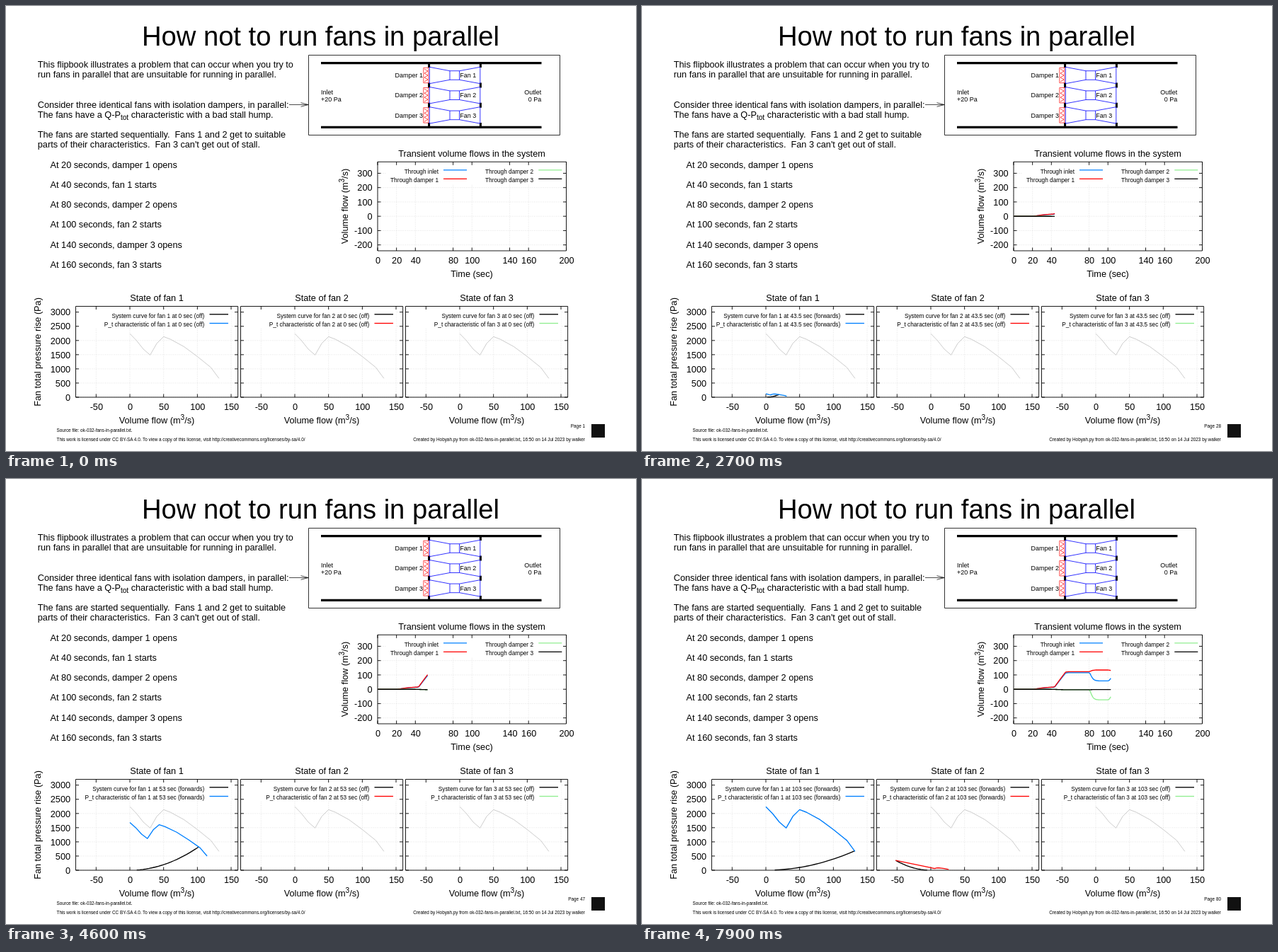
Animation of 890x629 px, one loop 8000 ms. Source, as an HTML page:

```html
<!DOCTYPE html>
<html lang="en">
<head>
<meta charset="utf-8">
<title>How not to run fans in parallel</title>
<style>
html, body { margin: 0; width: 100%; height: 100%; overflow: hidden; background: #fff; }
svg { display: block; width: 890px; height: 629px; }
text { font-family: "Liberation Sans", Arial, sans-serif; font-size: 12.69px; fill: #000; white-space: pre; }
.mid { text-anchor: middle; }
.end { text-anchor: end; }
.label { font-size: 8.98px; }
.key { font-size: 8.28px; }
.foot { font-size: 6.36px; }
.sub { font-size: 10.15px; }
path { fill: none; stroke: #000; stroke-width: .9; }
.grid { stroke: #d4d4d4; stroke-width: .6; stroke-dasharray: 1 1.6; }
.rated { stroke: #c0c0c0; stroke-width: .8; }
.curve { stroke-width: 1.35; stroke-linejoin: round; }
</style>
</head>
<body>
<svg id="stage" viewBox="0 0 890 629"></svg>
<script>
const BLUE = '#0080ff', RED = '#ff0000', GREEN = '#90ee90', BLACK = '#000';
const FAN_COLOURS = [BLUE, RED, GREEN];
const FAN_STARTS = [40, 100, 160];
const RAMP = 15, STEP_MS = 100, STEPS = 80;

// Fan characteristic at full speed: volume flow, total pressure rise
const RATED = [[0, 2240], [10, 1995], [20, 1695], [30, 1488], [40, 1900], [50, 2135],
  [60, 2045], [80, 1785], [100, 1435], [120, 1050], [132, 665]];

// Volume flow through each damper against time
const FLOWS = [
  [[0, 0], [20, 0], [24, 3], [30, 9], [35, 12.5], [40, 14.5], [42, 15], [43, 17], [44, 22],
    [45.5, 35.5], [48, 58], [53, 102], [55, 119], [56, 121.5], [60, 122.5], [80, 122.5],
    [82, 127], [84, 132], [87, 134.3], [100, 134.3], [103, 131.5]],
  [[0, 0], [40, -.4], [55, -3.5], [80, -3.5], [81, -12], [82, -28], [83, -43], [84, -55],
    [85, -63], [87, -71], [90, -73.5], [100, -74], [101, -71], [102, -63], [103, -52]],
  [[0, 0], [40, -.4], [55, -3.5], [80, -3.5], [85, -2], [103, -2]]
];

// Linear interpolation, extended past both ends
function lerp(points, x) {
  let i = 1;
  while (i < points.length - 1 && x > points[i][0]) i++;
  const [x0, y0] = points[i - 1], [x1, y1] = points[i];
  return y0 + (y1 - y0) * (x - x0) / (x1 - x0);
}

const flow = (fan, t) => lerp(FLOWS[fan], t);
const inlet = t => flow(0, t) + flow(1, t) + flow(2, t);

function simTime(step) {
  if (step < 20) return 2 * step;
  if (step < 50) return 40 + (step - 20) / 2;
  if (step < 73) return 55 + 2 * (step - 50);
  return 100 + (step - 73) / 2;
}

const text = (x, y, s, cls = '', extra = '') => `<text x="${x}" y="${y}" class="${cls}" ${extra}>${s}</text>`;
const path = (d, cls = '', extra = '') => `<path d="${d}" class="${cls}" ${extra}/>`;
const line = points => points.length > 1 ? 'M' + points.map(p => p[0].toFixed(2) + ' ' + p[1].toFixed(2)).join('L') : '';
const rect = (x, y, x2, y2) => `M${x} ${y}H${x2}V${y2}H${x}Z`;
const turned = (x, y, s) => text(0, 0, s, 'mid', `transform="translate(${x} ${y}) rotate(-90)"`);
const VOLUME = 'Volume flow (m<tspan class="sub" dy="-5">3</tspan><tspan dy="5">/s)</tspan>';

function makeChart(o) {
  return {
    ...o,
    px: v => o.x0 + v * o.sx,
    py: v => o.y0 - v * o.sy,
    trace(points) { return line(points.map(([x, y]) => [this.px(x), this.py(y)])); }
  };
}

// Grid, a gap for the key, ticks, tick labels and border
function drawChart(c) {
  let grid = '', ticks = '', labels = '';
  for (const v of c.xTicks) {
    const x = c.px(v);
    grid += `M${x} ${c.bottom}V${c.top}`;
    ticks += `M${x} ${c.bottom}v-4.5M${x} ${c.top}v4.5`;
    labels += text(x + .5, c.bottom + 18, v, 'mid');
  }
  for (const v of c.yTicks) {
    const y = c.py(v);
    grid += `M${c.left} ${y}H${c.right}`;
    ticks += `M${c.left} ${y}h4.5M${c.right} ${y}h-4.5`;
    if (c.yLabels) labels += text(c.left - 7.5, y + 4.7, v, 'end');
  }
  const [kx, ky, kx2, ky2] = c.keyBox;
  return path(grid, 'grid') +
    `<rect x="${kx}" y="${ky}" width="${kx2 - kx}" height="${ky2 - ky}" fill="#fff"/>` +
    path(ticks + rect(c.left, c.top, c.right, c.bottom)) + labels +
    `<clipPath id="${c.id}"><path d="${rect(c.left, c.top, c.right, c.bottom + .4)}"/></clipPath>`;
}

const flowChart = makeChart({
  id: 'flows', left: 525, right: 791.5, top: 220.3, bottom: 346, x0: 525, y0: 297.2, sx: 1.3325, sy: .2025,
  xTicks: [0, 20, 40, 80, 100, 140, 160, 200], yTicks: [-200, -100, 0, 100, 200, 300],
  yLabels: true, keyBox: [538, 226, 787, 252]
});

const fanCharts = [0, 1, 2].map(i => {
  const dx = 233 * i;
  return makeChart({
    id: 'fan' + i, left: 98.5 + dx, right: 327.6 + dx, top: 424.5, bottom: 553, x0: 175 + dx, y0: 553, sx: .9535, sy: .0401,
    xTicks: [-50, 0, 50, 100, 150], yTicks: [0, 500, 1000, 1500, 2000, 2500, 3000],
    yLabels: i === 0, keyBox: [104 + dx, 430, 318 + dx, 456]
  });
});

const keyLine = (x, x2, y, colour) => path(`M${x} ${y}H${x2}`, 'curve', `style="stroke:${colour}"`);

function drawNotes() {
  const notes = [
    [0, 'This flipbook illustrates a problem that can occur when you try to'],
    [1, 'run fans in parallel that are unsuitable for running in parallel.'],
    [4, 'Consider three identical fans with isolation dampers, in parallel:'],
    [5, 'The fans have a Q-P<tspan class="sub" dy="3.5">tot</tspan><tspan dy="-3.5"> characteristic with a bad stall hump.</tspan>'],
    [7, 'The fans are started sequentially.  Fans 1 and 2 get to suitable'],
    [8, "parts of their characteristics.  Fan 3 can't get out of stall."]
  ];
  const events = [1, 2, 3].flatMap(n => [
    `At ${60 * n - 40} seconds, damper ${n} opens`, `At ${60 * n - 20} seconds, fan ${n} starts`]);
  const row = k => 87.3 + 14.13 * k;
  return text(444.5, 56.3, 'How not to run fans in parallel', 'mid', 'style="font-size:38.2px"') +
    notes.map(([k, s]) => text(44.8, row(k), s)).join('') +
    events.map((s, i) => text(62.6, row(10 + 2 * i), s)).join('');
}

function drawLayout() {
  let out = path(rect(427.5, 69.5, 782.5, 182.5), '', 'style="stroke-width:.8"') +
    path('M400 139.5H427M416.5 136.7L427 139.5L416.5 142.3', '', 'style="stroke-width:.7"') +
    path('M445 80.6H756.5M445 171.4H756.5', '', 'style="stroke-width:3.4"') +
    text(445, 124.7, 'Inlet', 'label') + text(445, 134.6, '+20 Pa', 'label') +
    text(756.3, 124.7, 'Outlet', 'label end') + text(756.3, 134.6, '0 Pa', 'label end');
  for (const x of [597.6, 670.4])
    out += path(`M${x} 81V87M${x} 108.5V115.5M${x} 136.8V143.8M${x} 165V171`, '', 'style="stroke-width:3"');
  for (let i = 0; i < 3; i++) {
    const y = 98 + 28.2 * i;
    let zigzag = `M591 ${y - 9}`;
    for (let k = 1; k < 7; k++) zigzag += `L${k % 2 ? 596 : 591} ${y - 9 + 3 * k}`;
    out += path(rect(589.8, y - 10.7, 596.8, y + 10.7) + zigzag, '', `style="stroke:${RED};stroke-width:.7"`) +
      path(`M598.3 ${y - 11.7}V${y + 11.7}L627 ${y + 6.3}H640.5L669.8 ${y + 11.7}V${y - 11.7}L640.5 ${y - 6.3}H627Z` +
        `M627 ${y - 6.3}V${y + 6.3}M640.5 ${y - 6.3}V${y + 6.3}`, '', 'style="stroke:#00f;stroke-width:.8"') +
      text(589, y + 3.2, 'Damper ' + (i + 1), 'label end') + text(641.2, y + 3.2, 'Fan ' + (i + 1), 'label');
  }
  return out;
}

function drawFlowChart() {
  const keys = [['Through inlet', BLUE, 0, 0], ['Through damper 1', RED, 0, 1],
    ['Through damper 2', GREEN, 1, 0], ['Through damper 3', BLACK, 1, 1]];
  return drawChart(flowChart) +
    text(658, 212.8, 'Transient volume flows in the system', 'mid') +
    text(658, 383, 'Time (sec)', 'mid') + turned(483, 283, VOLUME) +
    keys.map(([s, colour, col, row]) => text(611 + 134 * col, 236.8 + 12.6 * row, s, 'key end') +
      keyLine(618 + 134.3 * col, 651 + 134.3 * col, 231.8 + 12.5 * row, colour)).join('') +
    `<g clip-path="url(#flows)">` +
    [BLUE, RED, GREEN, BLACK].map((c, i) => path('', 'curve', `id="flow${i}" style="stroke:${c}"`)).join('') + '</g>';
}

function drawFanChart(c, i) {
  const dx = 233 * i;
  return drawChart(c) +
    text(213 + dx, 416.6, 'State of fan ' + (i + 1), 'mid') + text(213 + dx, 590, VOLUME, 'mid') +
    text(280.2 + dx, 440.8, '', 'key end', `id="sysText${i}"`) + keyLine(287.5 + dx, 314 + dx, 435.8, BLACK) +
    text(280.2 + dx, 453.3, '', 'key end', `id="charText${i}"`) + keyLine(287.5 + dx, 314 + dx, 448.5, FAN_COLOURS[i]) +
    `<g clip-path="url(#${c.id})">` + path(c.trace(RATED), 'rated') +
    path('', 'curve', `id="sys${i}"`) + path('', 'curve', `id="char${i}" style="stroke:${FAN_COLOURS[i]}"`) + '</g>';
}

function drawFooter() {
  return text(71.5, 602, 'Source file: ok-032-fans-in-parallel.txt.', 'foot') +
    text(71.5, 614.8, 'This work is licensed under CC BY-SA 4.0. To view a copy of this license, visit http://creativecommons.org/licenses/by-sa/4.0/', 'foot') +
    text(818, 614.8, 'Created by Hobyah.py from ok-032-fans-in-parallel.txt, 16:50 on 14 Jul 2023 by walker', 'foot end') +
    text(818, 595.8, '', 'foot end', 'id="page"') +
    '<rect x="827" y="591" width="19" height="19" fill="#111"/>';
}

document.getElementById('stage').innerHTML = drawNotes() + drawLayout() + drawFlowChart() +
  fanCharts.map(drawFanChart).join('') + turned(49, 489, 'Fan total pressure rise (Pa)') + drawFooter();

const el = id => document.getElementById(id);
const setPath = (id, d) => el(id).setAttribute('d', d);

function updateFan(i, t) {
  const c = fanCharts[i], running = t > FAN_STARTS[i];
  const tail = `fan ${i + 1} at ${t} sec (${running ? 'forwards' : 'off'})`;
  el('sysText' + i).textContent = 'System curve for ' + tail;
  el('charText' + i).textContent = 'P_t characteristic of ' + tail;
  let system = [], characteristic = [];
  if (running) {
    // Fan laws: flow scales with speed, pressure with its square
    const speed = Math.min(1, (t - FAN_STARTS[i]) / RAMP);
    const q = flow(i, t), p = lerp(RATED, q / speed) * speed ** 2;
    characteristic = RATED.map(([a, b]) => [a * speed, b * speed ** 2]);
    if (q < 0) characteristic.unshift([q, p]);
    if (q > 132 * speed) characteristic.push([q, p]);
    for (let f = .1; f < 1.01; f += .045) system.push([q * f, p * f * f]);
  }
  setPath('sys' + i, c.trace(system));
  setPath('char' + i, c.trace(characteristic));
}

function show(step) {
  const t = simTime(step);
  [inlet, ...[0, 1, 2].map(i => s => flow(i, s))].forEach((f, i) => {
    const points = [];
    for (let s = 0; s <= t; s += .5) points.push([s, f(s)]);
    setPath('flow' + i, flowChart.trace(points));
  });
  for (let i = 0; i < 3; i++) updateFan(i, t);
  el('page').textContent = 'Page ' + (step + 1);
}

let shown = -1;
function tick() {
  const step = Math.floor(performance.now() / STEP_MS) % STEPS;
  if (step !== shown) show(shown = step);
  requestAnimationFrame(tick);
}
tick();
</script>
</body>
</html>
```
